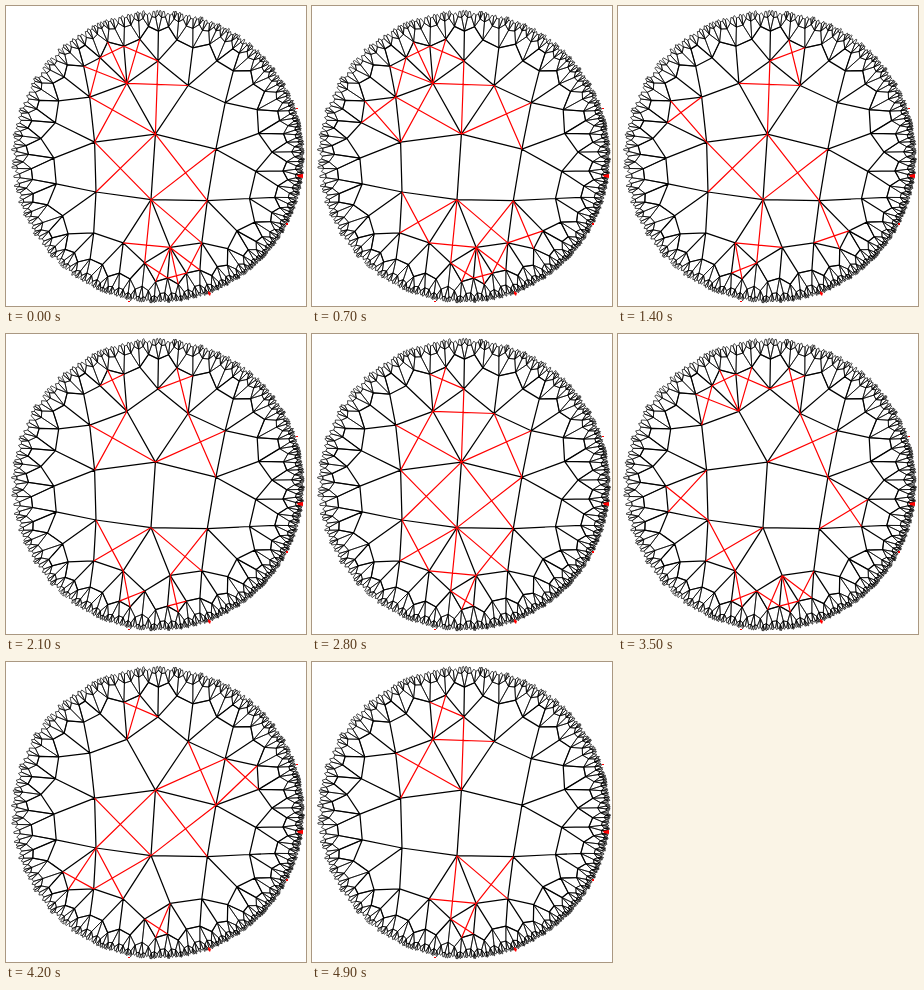
Animation of 300x300 px, one loop 5600 ms. Source, as an HTML page:

```html
<!DOCTYPE html>
<html lang="en">
<head>
<meta charset="utf-8">
<title>Hyperbolic tiling</title>
<style>
html, body { margin: 0; width: 100%; height: 100%; overflow: hidden; background: #fff; }
svg { display: block; width: 100%; height: 100%; }
path { fill: none; stroke: #000; stroke-linejoin: round; }
.inner { stroke-width: 1.25; }
.rim { stroke-width: .7; }
.state { stroke: #f00; stroke-width: 1.2; visibility: hidden; animation: show 5.6s step-end infinite; }
.mark { fill: #f00; stroke: none; }
@keyframes show {
  0% { visibility: visible; }
  12.5%, 100% { visibility: hidden; }
}
</style>
</head>
<body>
<svg id="stage" viewBox="0 0 300 300"></svg>
<script>
// Square tiling with five squares at each vertex, on the hyperboloid.
const EDGE = 2 * Math.acosh(Math.cos(Math.PI / 4) / Math.sin(Math.PI / 5));
const HALF_DIAG = Math.acosh(1 / Math.tan(Math.PI / 5));
const LIMIT = Math.cosh(5.6);
const stage = document.getElementById('stage');
const rad = deg => deg * Math.PI / 180;

const mul = (a, b) => a.map(row => [0, 1, 2].map(j => row[0] * b[0][j] + row[1] * b[1][j] + row[2] * b[2][j]));
const chain = (...list) => list.reduce((a, b) => mul(a, b));
const turn = deg => {
  const c = Math.cos(rad(deg)), s = Math.sin(rad(deg));
  return [[c, -s, 0], [s, c, 0], [0, 0, 1]];
};
const shift = d => {
  const c = Math.cosh(d), s = Math.sinh(d);
  return [[c, 0, s], [0, 1, 0], [s, 0, c]];
};
const step = (m, k) => chain(m, turn(72 * k), shift(EDGE), turn(180));
const across = (m, k, d) => chain(m, turn(72 * k + 36), shift(d));
const pos = m => m.map(row => row[2]);
const key = m => pos(m).slice(0, 2).map(v => v.toFixed(2)).join();

function project(m) {
  const [x, y, w] = pos(m);
  const r = 150 * Math.tanh(Math.acosh(Math.max(1, w)) / 2.8) / Math.hypot(x, y);
  return (150.9 + x * r).toFixed(1) + ' ' + (150 + y * r).toFixed(1);
}

function add(cls, d) {
  const p = document.createElementNS('http://www.w3.org/2000/svg', 'path');
  p.setAttribute('class', cls);
  p.setAttribute('d', d);
  stage.append(p);
  return p;
}

const corners = (m, k) => [m, step(m, k), across(m, k, 2 * HALF_DIAG), step(m, k + 1)];
const base = chain(turn(-93.8), shift(.412), turn(186.8));
const root = pos(across(base, 4, HALF_DIAG));
const near = m => {
  const [x, y, w] = pos(m);
  return w * root[2] - x * root[0] - y * root[1] < LIMIT;
};

function drawTiling() {
  const queue = [base], verts = new Set([key(base)]), faces = new Set();
  let inner = '', rim = '';
  for (const m of queue) {
    for (let k = 0; k < 5; k++) {
      const mid = across(m, k, HALF_DIAG), id = key(mid);
      if (!near(mid) || faces.has(id)) continue;
      faces.add(id);
      const d = 'M' + corners(m, k).map(project).join('L') + 'Z';
      if (mid[2][2] < 12) inner += d; else rim += d;
      const next = step(m, k);
      for (const n of [next, step(m, k + 1), step(next, 4)]) {
        if (verts.has(key(n))) continue;
        verts.add(key(n));
        queue.push(n);
      }
    }
  }
  add('rim', rim);
  add('inner', inner);
}

// Each code walks edges from a vertex; its last digit picks the square.
function cross(start, code) {
  const route = [...code].map(Number), face = route.pop();
  const at = route.reduce((m, k) => step(m, k), start);
  const [a, b, c, d] = corners(at, face).map(project);
  return `M${a}L${c}M${b}L${d}`;
}

const states = [
  '0 1 2 21 22 23',
  '1 2 3 21 22 23 13',
  '0 2 13 31',
  '1 3 22 31',
  '0 1 2 3 23',
  '3 11 21 22 23 31',
  '0 3 23 41',
  '1 2 23'
];
// The third and following states differ only in which squares are crossed.
[states[3], states[4], states[5]] = [states[3], states[4], states[5]];

drawTiling();
const twin = step(base, 0);
states.forEach((codes, i) => {
  const d = codes.split(' ').map(c => cross(base, c) + cross(twin, c)).join('');
  add('state', d).style.animationDelay = (i - 8) * .7 + 's';
});
add('mark', 'M291 169l6-1v4l-5-1zM202 285l3 2-1 3-2-2zM280 217h2v2h-2zM290 102h2v1h-2zM122 295h2v1h-2z');
</script>
</body>
</html>
```
